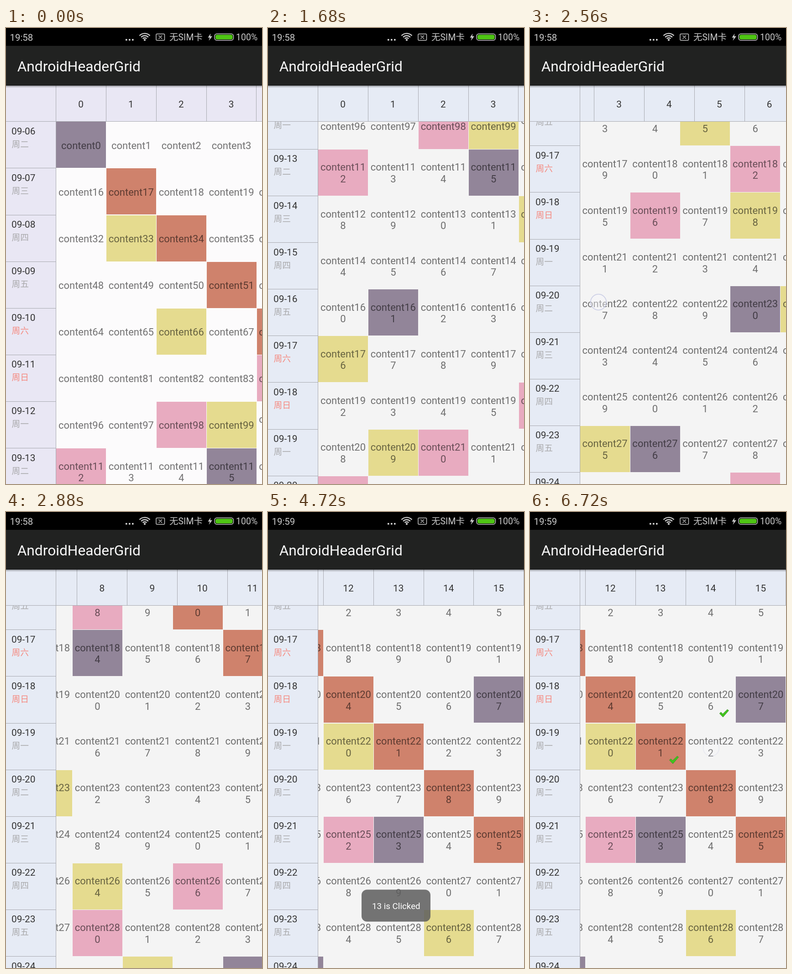
Write an HTML page with a canvas that moves like this. It is 561 px wide and 998 px high and loops after 6.8 s.

```html
<!DOCTYPE html>
<html lang="zh">
<head>
<meta charset="utf-8">
<style>
html, body { margin: 0; width: 100%; height: 100%; overflow: hidden; background: #000; }
canvas { display: block; }
</style>
</head>
<body>
<canvas id="stage" width="561" height="998"></canvas>
<script>
const ctx = document.getElementById('stage').getContext('2d');
const W = 561, H = 998, LOOP = 6800, STEP = 80;
const CELL_W = 109.86, CELL_H = 102.1, LEFT = 109.6, TOP = 204.3, COLS = 16;
const SANS = 'Roboto, sans-serif';
const CJK = 'Roboto, "Noto Sans CJK SC", "Noto Sans CJK", sans-serif';
const INK = 'rgba(0,0,0,0.55)', LINE = '#a8aab0';

// Scroll offsets as [ms, px] points
const SCROLL_Y = [[720, 0], [800, 8], [960, 60], [1120, 172], [1280, 370], [1440, 520], [1600, 620],
  [1760, 680], [1920, 715], [2080, 867.3], [2240, 1020], [2400, 1070.1]];
const SCROLL_X = [[2400, 0], [2560, 330], [2720, 700], [2880, 843], [3040, 960], [3200, 1060],
  [3360, 1140], [3520, 1195], [3640, 1222.3], [3680, 1222.3], [3760, 1255], [3840, 1290], [4000, 1306.5]];
const HEADER_LAG = 13.5;

function along(points, t) {
  const last = points.length - 1;
  if (t <= points[0][0]) return points[0][1];
  if (t >= points[last][0]) return points[last][1];
  const i = points.findIndex(p => p[0] > t) - 1;
  const rate = k => (points[k + 1][1] - points[k][1]) / (points[k + 1][0] - points[k][0]);
  const slope = k => {
    if (k === 0 || k === last || !rate(k - 1) || !rate(k)) return 0;
    return (points[k + 1][1] - points[k - 1][1]) / (points[k + 1][0] - points[k - 1][0]);
  };
  const [t0, a] = points[i], [t1, b] = points[i + 1];
  const d = t1 - t0, u = (t - t0) / d, v = 1 - u;
  return a * (1 + 2 * u) * v * v + b * u * u * (3 - 2 * u)
    + d * u * v * (slope(i) * v - slope(i + 1) * u);
}

const clamp = x => Math.max(0, Math.min(1, x));

function rect(color, x, y, w, h) {
  ctx.fillStyle = color;
  ctx.fillRect(x, y, w, h);
}

function text(str, x, y, size, color, align = 'left', family = SANS) {
  ctx.font = `${size}px ${family}`;
  ctx.textAlign = align;
  ctx.fillStyle = color;
  ctx.fillText(str, x, y);
}

function clipped(x, y, w, h, draw) {
  ctx.save();
  ctx.beginPath();
  ctx.rect(x, y, w, h);
  ctx.clip();
  draw();
  ctx.restore();
}

function roundBox(x, y, w, h, r) {
  ctx.beginPath();
  ctx.roundRect(x, y, w, h, r);
}

function polygon(points) {
  ctx.beginPath();
  points.forEach(p => ctx.lineTo(p[0], p[1]));
  ctx.closePath();
}

function cellColor(n) {
  if (n % 23 === 0) return '#928599';
  if (n % 17 === 0) return '#cf826c';
  if (n % 11 === 0) return '#e5db8f';
  if (n % 14 === 0) return '#e8abc0';
  return null;
}

function drawTick(x, y) {
  ctx.save();
  ctx.translate(x, y);
  polygon([[-10, 0.5], [-7, -2.5], [-3, 1.5], [7, -8.3], [10, -6], [-2.5, 8.3]]);
  ctx.fillStyle = '#41c41c';
  ctx.strokeStyle = '#37942a';
  ctx.lineWidth = 1;
  ctx.fill();
  ctx.stroke();
  ctx.restore();
}

function drawCells(sx, sy, ticked) {
  const firstRow = Math.floor(sy / CELL_H), firstCol = Math.floor(sx / CELL_W);
  for (let r = firstRow; r < firstRow + 9; r++) {
    const y = TOP + r * CELL_H - sy;
    for (let c = firstCol; c < Math.min(COLS, firstCol + 6); c++) {
      const n = r * COLS + c, x = LEFT + c * CELL_W - sx;
      const color = cellColor(n), label = 'content' + n, mid = x + 54.9;
      if (color) rect(color, Math.ceil(x), Math.round(y) + 1, 109, 101);
      if (label.length > 9) {
        text(label.slice(0, 9), mid, y + 47.5, 22, INK, 'center');
        text(label.slice(9), mid, y + 73.1, 22, INK, 'center');
      } else {
        text(label, mid, y + 60.3, 22, INK, 'center');
      }
      if (ticked.includes(n)) drawTick(x + 84.3, y + 81.1);
    }
  }
}

function drawDates(sy) {
  const first = Math.floor(sy / CELL_H);
  for (let r = first; r < first + 9; r++) {
    const y = TOP + r * CELL_H - sy;
    const weekend = r % 7 === 4 || r % 7 === 5;
    rect(LINE, 0, Math.round(y), 109, 1);
    text('09-' + String(r + 6).padStart(2, '0'), 12, y + 28.5, 20.8, '#333');
    text('周' + '二三四五六日一'[r % 7], 12.6, y + 56.5, 18.7, weekend ? '#f5897f' : '#a9a9ab', 'left', CJK);
  }
}

function drawHeader(sx) {
  const first = Math.floor(sx / CELL_W);
  for (let c = first; c < Math.min(COLS, first + 6); c++) {
    const x = LEFT + c * CELL_W - sx;
    rect(LINE, Math.round(x + CELL_W - 0.6), 126, 1, 78);
    text(c, x + 54.5, 173.5, 20.8, '#333', 'center');
  }
}

function drawStatusBar(t) {
  const gray = '#c9c9c9';
  rect('#000', 0, 0, W, 39);
  text(t < 3200 ? '19:58' : '19:59', 8.5, 27.5, 20.4, gray);
  for (const x of [264, 271, 278]) rect(gray, x - 2, 24, 3.6, 3.6);

  ctx.strokeStyle = gray;
  ctx.lineWidth = 2.4;
  for (const r of [6, 10.8, 15.6]) {
    ctx.beginPath();
    ctx.arc(304, 27.5, r, -Math.PI * 0.76, -Math.PI * 0.24);
    ctx.stroke();
  }
  ctx.beginPath();
  ctx.arc(304, 26, 2.2, 0, 7);
  ctx.fillStyle = gray;
  ctx.fill();

  ctx.lineWidth = 1.5;
  roundBox(329, 13, 18.5, 14, 2);
  ctx.moveTo(334.5, 16.5); ctx.lineTo(342, 23.5);
  ctx.moveTo(342, 16.5); ctx.lineTo(334.5, 23.5);
  ctx.stroke();

  text('无SIM卡', 358, 27, 19.5, gray, 'left', CJK);
  polygon([[448.5, 12], [442.5, 21], [446.5, 21], [444.5, 28], [452, 18], [447.5, 18]]);
  ctx.fillStyle = gray;
  ctx.fill();

  roundBox(457, 12.7, 41.5, 14.2, 5);
  ctx.stroke();
  roundBox(459, 14.7, 37.5, 10.2, 3.5);
  ctx.fillStyle = '#4fc514';
  ctx.fill();
  text('100%', 504, 27, 19.5, gray);
}

function drawActionBar() {
  rect('#212221', 0, 39, W, 87);
  rect('#111', 0, 125, W, 1);
  const shade = ctx.createLinearGradient(0, 126, 0, 131);
  shade.addColorStop(0, 'rgba(0,0,0,0.35)');
  shade.addColorStop(1, 'rgba(0,0,0,0)');
  rect(shade, 0, 126, W, 5);
  text('AndroidHeaderGrid', 24.7, 95, 31.7, '#f8f8f8');
}

function drawToast(t) {
  const enter = clamp((t - 4480) / 240), leave = clamp((t - 6140) / 400);
  const alpha = (1 - (1 - enter) ** 2) * (1 - leave ** 2);
  if (!alpha) return;
  ctx.save();
  ctx.globalAlpha = alpha;
  roundBox(205, 826.5, 151, 70, 12);
  ctx.fillStyle = 'rgba(93,93,93,0.85)';
  ctx.fill();
  text('13 is Clicked', 280.8, 869.4, 18.8, '#fff', 'center');
  ctx.restore();
}

function drawTouches(t, sx, sy) {
  // [start, end, x, y, peak opacity]
  const touches = [
    [800, 1240, 349, 797 - sy, 1],
    [1920, 2220, 380, 1437 - sy, 1],
    [2400, 2660, 480 - sx, 600, 1],
    [3640, 3960, 1507.3 - sx, 606, 1],
    [4400, 4640, 285, 172, 1],
    [5360, 5600, 397, 428, 1],
    [5680, 6080, 293, 515, 1],
    [6720, 6880, 397, 517, 0.25]
  ];
  for (const [start, end, x, y, peak] of touches) {
    if (t < start || t >= end) continue;
    ctx.save();
    ctx.globalAlpha = peak * clamp((end - t) / 120);
    ctx.beginPath();
    ctx.arc(x, y, 17.3, 0, 7);
    ctx.fillStyle = 'rgba(246,246,250,0.5)';
    ctx.strokeStyle = '#c6c9e4';
    ctx.lineWidth = 1.8;
    ctx.fill();
    ctx.stroke();
    ctx.restore();
  }
}

function draw(t) {
  const sx = along(SCROLL_X, t), sy = along(SCROLL_Y, t);
  const idle = t < 800;
  const panel = idle ? '#e9e7f4' : '#e6ebf5';
  const ticked = [];
  if (t >= 5600) ticked.push(206);
  if (t >= 6080) ticked.push(221);

  rect(idle ? '#fcfbfc' : '#f4f4f4', 0, 0, W, H);
  clipped(110, 205, W - 110, H - 205, () => drawCells(sx, sy, ticked));
  rect(panel, 0, 205, 109, H - 205);
  clipped(0, 205, 109, H - 205, () => drawDates(sy));
  rect(panel, 0, 126, W, 78);
  clipped(110, 126, W - 110, 78, () => drawHeader(along(SCROLL_X, t - HEADER_LAG)));
  rect(LINE, 109, 126, 1, H - 126);
  rect(LINE, 0, 204, W, 1);
  drawActionBar();
  drawStatusBar(t);
  drawToast(t);
  drawTouches(t, sx, sy);
}

const origin = performance.now();
function tick() {
  const t = (performance.now() - origin) % LOOP;
  draw(Math.floor(t / STEP) * STEP);
  requestAnimationFrame(tick);
}
tick();
</script>
</body>
</html>
```
